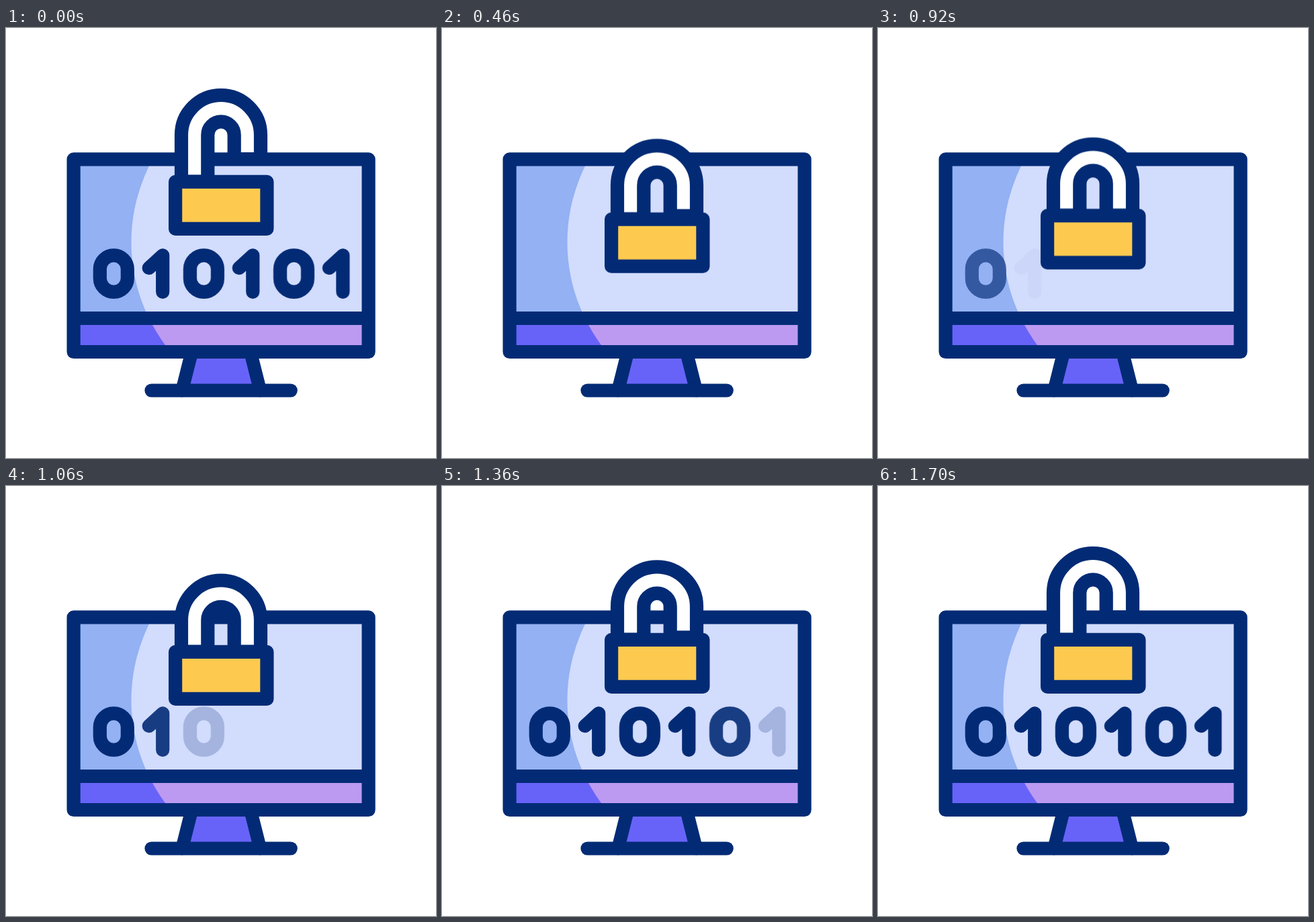
An HTML page for the animation above (2.42 s loop, 640x640 px).

```html
<!DOCTYPE html>
<html lang="en">
<head>
<meta charset="utf-8">
<title>Computer lock</title>
<style>
  html, body { margin: 0; width: 100%; height: 100%; overflow: hidden; background: #fff; }
  svg { display: block; width: 100vw; height: 100vh; }

  .line { fill: none; stroke: #032b75; stroke-width: 20.2; stroke-linecap: round; stroke-linejoin: round; }
  .lock, .shackle, .digits use {
    animation: 2420ms cubic-bezier(.3333, 0, .6667, 1) infinite;
  }

  /* Down 0-600 ms, back up 800-1200 ms */
  .lock { animation-name: slide; }
  @keyframes slide {
    0%, 49.587%, 100% { transform: translateY(0); }
    24.793%, 33.058% { transform: translateY(64.5px); }
  }

  /* Closes 0-600 ms, opens 1280-1700 ms */
  .shackle { fill: #fff; animation-name: close; }
  @keyframes close {
    0%, 70.248%, 100% {
      d: path("M261 228.5 L261 159 A59 59 0 0 1 379 159 L379 195 L339.7 195 L339.7 159 A19.7 19.7 0 0 0 300.3 159 L300.3 228.5 Z");
    }
    24.793%, 52.893% {
      d: path("M261 228.5 L261 181.5 A59 59 0 0 1 379 181.5 L379 228.5 L339.7 228.5 L339.7 181.5 A19.7 19.7 0 0 0 300.3 181.5 L300.3 228.5 Z");
    }
  }

  /* All fade out 0-400 ms, then return one by one: 200 ms each, 100 ms apart from 800 ms */
  .digits use:nth-child(1) { animation-name: digit1; }
  .digits use:nth-child(2) { animation-name: digit2; }
  .digits use:nth-child(3) { animation-name: digit3; }
  .digits use:nth-child(4) { animation-name: digit4; }
  .digits use:nth-child(5) { animation-name: digit5; }
  .digits use:nth-child(6) { animation-name: digit6; }
  @keyframes digit1 { 0%, 41.322%, 100% { opacity: 1; } 16.529%, 33.058% { opacity: 0; } }
  @keyframes digit2 { 0%, 45.455%, 100% { opacity: 1; } 16.529%, 37.190% { opacity: 0; } }
  @keyframes digit3 { 0%, 49.587%, 100% { opacity: 1; } 16.529%, 41.322% { opacity: 0; } }
  @keyframes digit4 { 0%, 53.719%, 100% { opacity: 1; } 16.529%, 45.455% { opacity: 0; } }
  @keyframes digit5 { 0%, 57.851%, 100% { opacity: 1; } 16.529%, 49.587% { opacity: 0; } }
  @keyframes digit6 { 0%, 61.983%, 100% { opacity: 1; } 16.529%, 53.719% { opacity: 0; } }
</style>
</head>
<body>
<svg viewBox="0 0 640 640">
  <defs>
    <clipPath id="lit"><circle cx="442.8" cy="319" r="256.3"/></clipPath>
    <rect id="zero" class="line" x="139.8" y="338.3" width="41" height="54.6" rx="20.5"/>
    <path id="one" class="line" d="M212.7 357.2 L233.2 338.4 V392.8"/>
  </defs>

  <!-- stand -->
  <path d="M274 488 H366 L376 540 H264 Z" fill="#6863f8"/>
  <path class="line" style="stroke-width: 19.6" d="M276.5 482 L262 539.5 M363.8 482 L378.3 539.5"/>
  <path class="line" d="M216.5 539.5 H423.7"/>

  <!-- screen -->
  <path d="M100 195 H540 V432 H100 Z" fill="#93b1f3"/>
  <path d="M100 432 H540 V482 H100 Z" fill="#6863f8"/>
  <g clip-path="url(#lit)">
    <path d="M180 195 H540 V432 H180 Z" fill="#d2dcfd"/>
    <path d="M180 432 H540 V482 H180 Z" fill="#bc9af2"/>
  </g>
  <path class="line" d="M100.6 195.3 H539.6 V482 H100.6 Z M100.6 432 H539.6"/>

  <g class="digits">
    <use href="#zero"/>
    <use href="#one"/>
    <use href="#zero" x="134.1"/>
    <use href="#one" x="134.1"/>
    <use href="#zero" x="268.2"/>
    <use href="#one" x="268.2"/>
  </g>

  <g class="lock">
    <path class="line shackle" style="fill: #fff" d="M261 228.5 L261 159 A59 59 0 0 1 379 159 L379 195 L339.7 195 L339.7 159 A19.7 19.7 0 0 0 300.3 159 L300.3 228.5 Z"/>
    <rect class="line" style="fill: #fdca4f" x="252.1" y="228.8" width="136.3" height="70.1"/>
  </g>
</svg>
</body>
</html>
```
